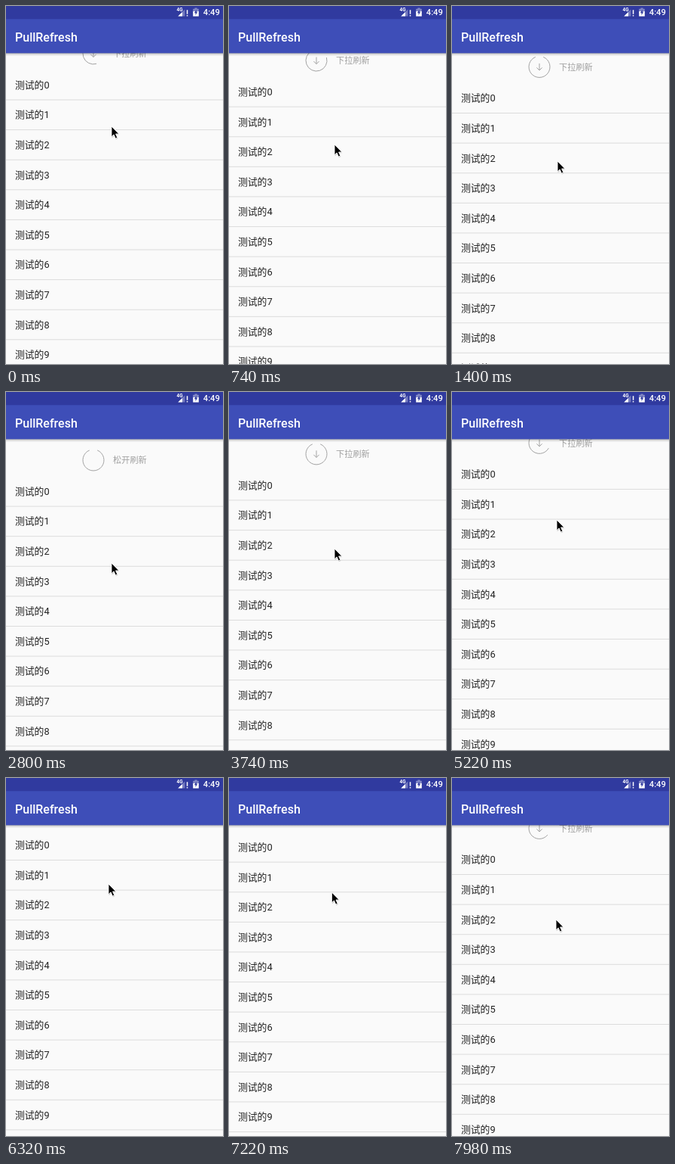
Animation of 288x473 px, one loop 8000 ms. Source, as an HTML page:

```html
<!DOCTYPE html>
<html lang="zh-CN">
<head>
<meta charset="utf-8">
<title>PullRefresh</title>
<style>
html, body { margin: 0; width: 100%; height: 100%; overflow: hidden; background: #fafafa; }
svg { display: block; width: 288px; height: 473px; }
text { font-family: Roboto, "Noto Sans CJK SC", "Noto Sans CJK", sans-serif; }
.row { font-size: 12.8px; fill: #222; }
.hint { font-size: 11.2px; fill: #a0a0a0; }
.ring { fill: none; stroke: #a3a3a3; stroke-width: 1; }
.bar { fill: #fff; font-weight: 500; }
</style>
</head>
<body>
<svg viewBox="0 0 288 473">
  <defs>
    <linearGradient id="shade" x2="0" y2="1">
      <stop offset="0" stop-color="#000" stop-opacity=".34"/>
      <stop offset=".4" stop-color="#000" stop-opacity=".12"/>
      <stop offset="1" stop-color="#000" stop-opacity="0"/>
    </linearGradient>
  </defs>
  <rect width="288" height="473" fill="#fafafa"/>

  <g id="content">
    <g id="header" transform="translate(116 41.4)">
      <path id="arc" class="ring"/>
      <path id="arrow" class="ring" d="M0-4.5V4.5M-3.6 1L0 4.6L3.6 1"/>
      <text id="hint" class="hint" x="26" y="4.2"></text>
    </g>
    <g id="rows"></g>
  </g>

  <rect y="62" width="288" height="4.5" fill="url(#shade)"/>
  <rect width="288" height="62.3" fill="#3e4eb8"/>
  <rect width="288" height="17.3" fill="#303a9f"/>
  <text class="bar" x="12" y="46.6" font-size="16">PullRefresh</text>

  <g fill="#fff">
    <text class="bar" x="226.6" y="6.8" font-size="6.4" style="font-weight:700">4G</text>
    <path d="M237.4 4.5V13.6H228.3Z" opacity=".35"/>
    <path d="M234 8V13.6H228.3Z"/>
    <path d="M239.8 5.2h1.5v5.6h-1.5zM239.8 12h1.5v1.6h-1.5z"/>
    <path d="M250.4 2.6h3.2v1.2h2.2V7h-7.6V3.8h2.2z" opacity=".4"/>
    <path d="M248.2 7h7.6v6.6h-7.6z"/>
    <path d="M252.6 4.6L249.9 9.2h1.7v3l2.6-4.6h-1.6z" fill="#303a9f"/>
  </g>
  <text class="bar" x="261.8" y="12.2" font-size="11.2">4:49</text>

  <g id="cursor">
    <path d="M.6 1.4V15.2L3.6 12.2L5.9 17.2L8.5 16L6.2 11.2H10.3Z" fill="#000" opacity=".2"/>
    <path d="M0 0V13.8L3.1 10.9L5.3 16L7.8 14.9L5.6 10H9.9Z" fill="#000" stroke="#fff" stroke-width=".9"/>
  </g>
</svg>
<script>
const LOOP = 8000, ROW = 39.6, RADIUS = 14, TRIGGER = 43.2;
const $ = id => document.getElementById(id);

// time, pull distance, pointer x, pointer y
const keys = [
  [0, 21.5, 140, 159],
  [20, 21.5, 140, 159],
  [1400, 39, 140, 205],
  [1680, 41.7, 140, 211],
  [2260, 48.4, 140, 226],
  [2850, 48.6, 140, 226],
  [3090, 48.6, 140, 226],
  [3740, 40.5, 140, 207],
  [5220, 26, 139, 169],
  [6320, 6, 136, 140],
  [6620, 0, 135.5, 132],
  [6820, 0, 135.5, 132],
  [7980, 25, 138, 187],
  [LOOP, 25, 138, 187]
];

function pose(t) {
  const i = keys.findIndex(k => k[0] > t);
  const a = keys[i - 1], b = keys[i];
  const u = (t - a[0]) / (b[0] - a[0]);
  return [1, 2, 3].map(n => a[n] + (b[n] - a[n]) * u);
}

// angle in degrees, counter-clockwise from the top
function onRing(deg) {
  const r = deg * Math.PI / 180;
  return `${-RADIUS * Math.sin(r)} ${-RADIUS * Math.cos(r)}`;
}

function arcPath(pull) {
  const start = 22;
  const end = Math.max(start, Math.min(338, 197 + 9.8 * (pull - 21.5)));
  const large = end - start > 180 ? 1 : 0;
  return `M${onRing(start)}A${RADIUS} ${RADIUS} 0 ${large} 0 ${onRing(end)}`;
}

function buildRows() {
  let out = "";
  for (let i = 0; i < 11; i++) {
    const y = 102.5 + i * ROW;
    out += `<text class="row" x="12" y="${y - 15.2}">测试的${i}</text>` +
      `<rect y="${y - 0.5}" width="288" height="1" fill="#dcdcdc"/>`;
  }
  $("rows").innerHTML = out;
}

function draw(t) {
  const [pull, x, y] = pose(t);
  const ready = pull > TRIGGER;
  $("content").setAttribute("transform", `translate(0 ${pull})`);
  $("arc").setAttribute("d", arcPath(pull));
  $("arrow").setAttribute("visibility", ready ? "hidden" : "visible");
  $("hint").textContent = ready ? "松开刷新" : "下拉刷新";
  $("cursor").setAttribute("transform", `translate(${x} ${y})`);
}

buildRows();
draw(0);
const began = performance.now();
function tick() {
  draw((performance.now() - began) % LOOP);
  requestAnimationFrame(tick);
}
requestAnimationFrame(tick);
</script>
</body>
</html>
```
